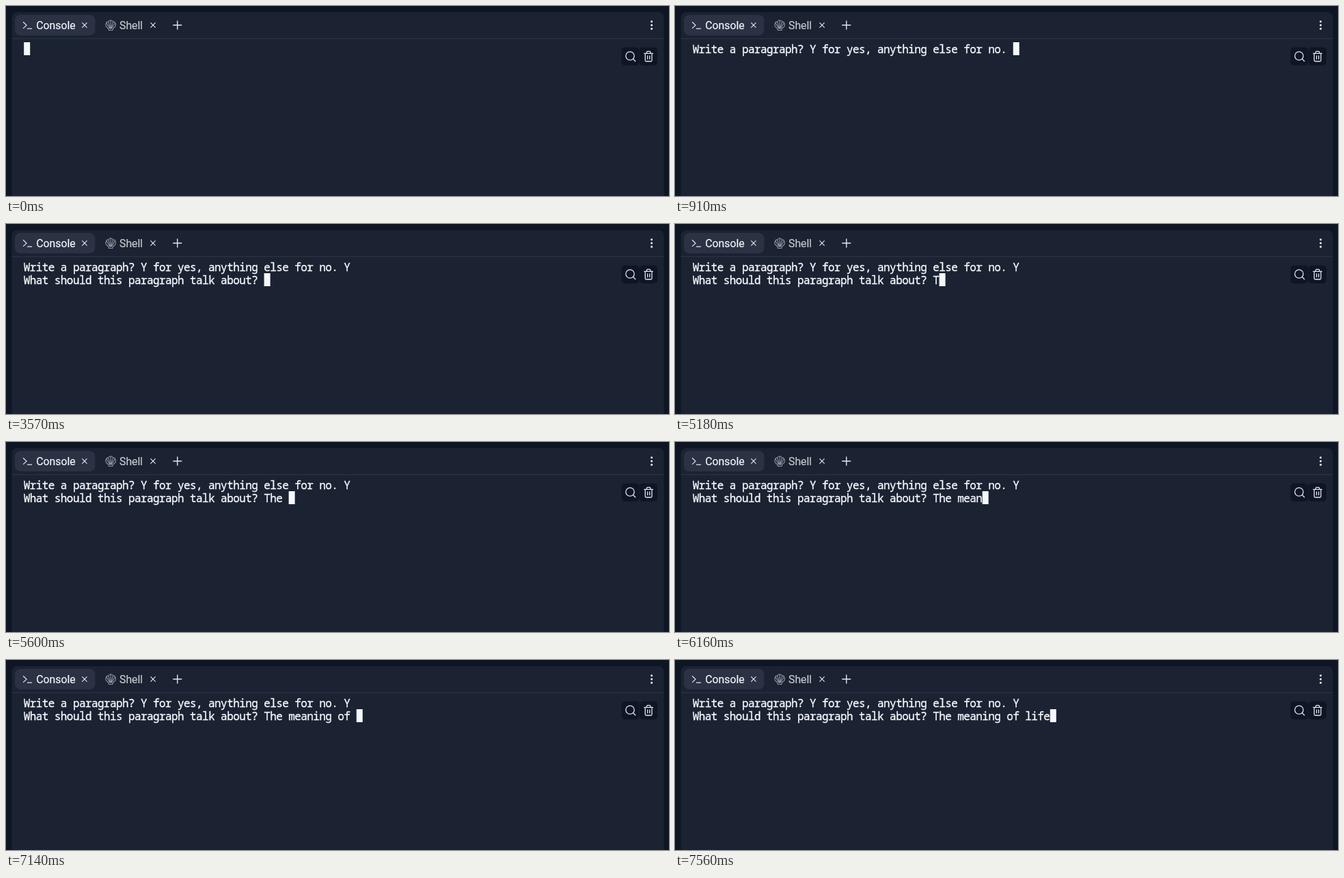
These frames come from a looping animation (970x278 px, 8 s). An HTML page:

```html
<!DOCTYPE html>
<html lang="en">
<head>
<meta charset="utf-8">
<title>Console</title>
<style>
html, body { margin: 0; width: 100%; height: 100%; overflow: hidden; background: #0e1525; }
svg { display: block; }
text { white-space: pre; }
.tab { font: 15.8px Roboto, sans-serif; }
.term {
  font: 500 16px "Noto Sans Mono", monospace; letter-spacing: -.59px;
  fill: #f5f9fc; stroke: #f5f9fc; stroke-width: .35;
}
.icon { fill: none; stroke: #e4e8ee; stroke-width: 1.3; stroke-linecap: round; stroke-linejoin: round; }
</style>
</head>
<body>
<svg width="970" height="278" viewBox="0 0 970 278">
  <rect x="8.5" y="9" width="954" height="290" rx="8" fill="#1b2232"/>
  <rect x="8.5" y="47" width="954" height="1.3" fill="#2a3244"/>
  <rect x="13" y="13" width="117.5" height="30" rx="8" fill="#2a3244"/>

  <text class="tab" x="44.3" y="34.2" fill="#f5f9fc" stroke="#f5f9fc" stroke-width=".2" textLength="">Console</text>
  <text class="tab" x="166" y="34.2" fill="#c2c8cc" stroke="#c2c8cc" stroke-width=".2">Shell</text>

  <g class="icon">
    <path d="M25.5 23.8l4.6 4.3-4.6 4.3M31.5 33.2h6"/>
    <path d="M111.6 24.7l6.6 6.6m0-6.6l-6.6 6.6M211.8 24.7l6.6 6.6m0-6.6l-6.6 6.6" stroke-width="1.1"/>
    <path d="M244.8 28h12M250.8 22v12" stroke-width="1.4"/>
    <path stroke="#8d96a5" stroke-width="1.1" d="M150.5 35.5h5.4l.6-2.5 3.6-3.2q1-3.2-.6-5.6-1.2-1.4-2.6-1-1.4-2.4-3.7-2.4t-3.7 2.4q-1.4-.4-2.6 1-1.6 2.4-.6 5.6l3.6 3.2zM152 33l-4.9-8M152.6 33l-2.8-9.6M153.8 33l2.8-9.6M154.4 33l4.9-8M153.2 33V21"/>
  </g>
  <g fill="#f5f9fc">
    <circle cx="944.6" cy="22.8" r="1.5"/>
    <circle cx="944.6" cy="28" r="1.5"/>
    <circle cx="944.6" cy="33.2" r="1.5"/>
  </g>

  <g fill="#0e1525">
    <rect x="900.5" y="60.5" width="26" height="26.5" rx="5"/>
    <rect x="927" y="60.5" width="26" height="26.5" rx="5"/>
  </g>
  <g class="icon">
    <circle cx="913" cy="73" r="6.2"/>
    <path d="M917.5 77.5l3.3 3.3"/>
    <path d="M933.8 69.3h12.6M935.2 69.3v10.2q0 1.5 1.5 1.5h6.8q1.5 0 1.5-1.5V69.3M937.4 69v-1.4q0-1.3 1.3-1.3h2.8q1.3 0 1.3 1.3V69M938.6 73v4.6M941.7 73v4.6"/>
  </g>

  <text class="term" id="line0" x="25.8" y="68.9"></text>
  <text class="term" id="line1" x="25.8" y="87.9"></text>
  <rect id="cursor" width="9" height="19" fill="#f5f9fc"/>
</svg>
<script>
const LOOP = 8000, CHAR = 9.01, ROW = 19;
const firstPrompt = "Write a paragraph? Y for yes, anything else for no. ";
const secondPrompt = "What should this paragraph talk about? ";
const answer = "The meaning of life";
// Time at which each answer character appears.
const keys = [5180, 5460, 5600, 5600, 5880, 6020, 6020, 6160, 6370, 6510,
  6650, 6720, 6860, 7000, 7140, 7210, 7350, 7490, 7560];
const el = id => document.getElementById(id);
const lines = [el("line0"), el("line1")], cursor = el("cursor");

function draw(t) {
  const typed = keys.filter(k => k <= t).length;
  const first = t < 910 ? "" : firstPrompt + (t < 3150 ? "" : "Y");
  const second = t < 3570 ? "" : secondPrompt + answer.slice(0, typed);
  const row = second ? 1 : 0;
  lines[0].textContent = first;
  lines[1].textContent = second;
  cursor.setAttribute("x", 26.2 + CHAR * (row ? second : first).length);
  cursor.setAttribute("y", 53 + ROW * row);
}

function tick() {
  draw(performance.now() % LOOP);
  requestAnimationFrame(tick);
}
tick();
</script>
</body>
</html>
```
